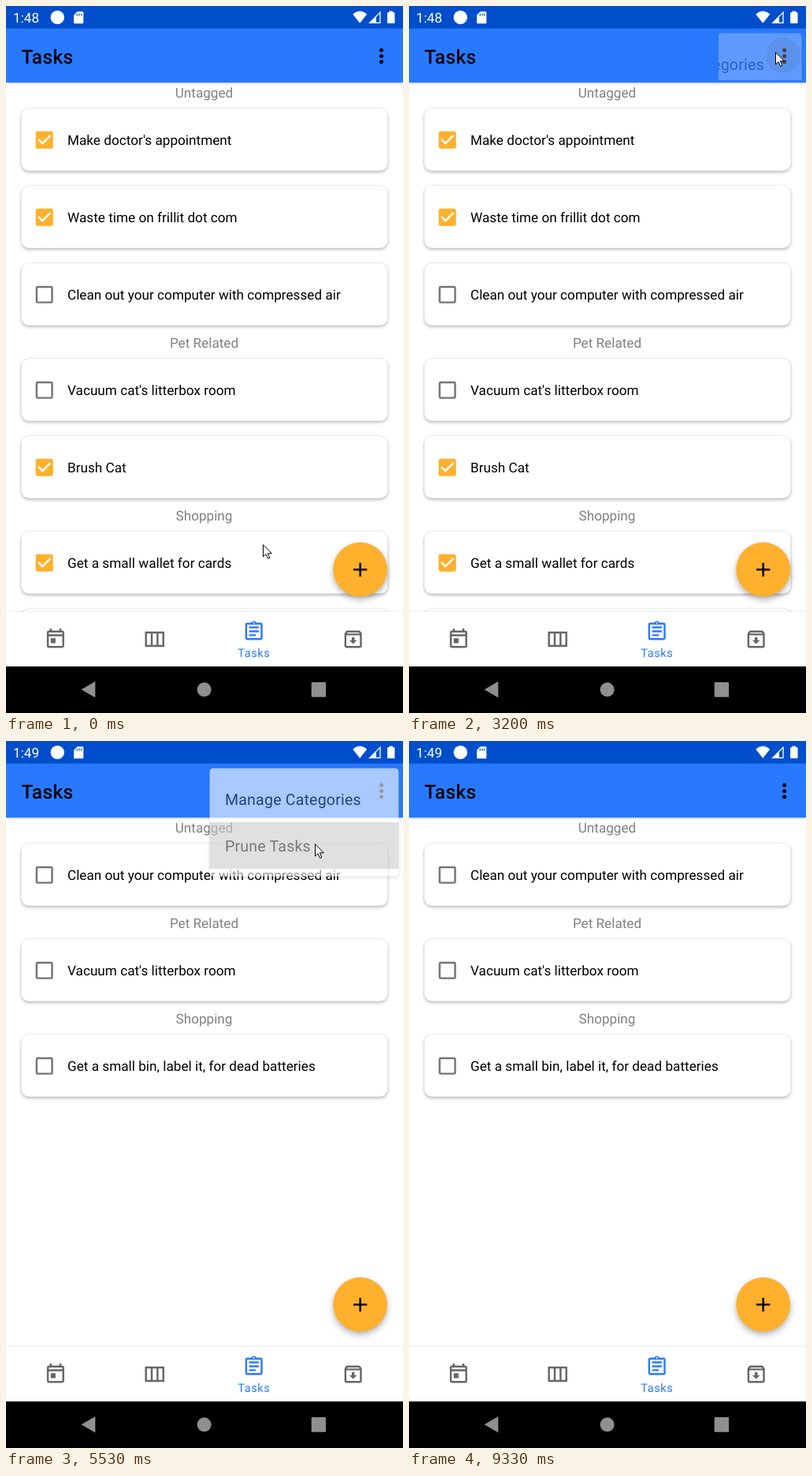
These frames come from a looping animation (504 by 896 pixels, 9670 ms). An HTML page:

```html
<!DOCTYPE html>
<html lang="en">
<head>
<meta charset="utf-8">
<title>Tasks</title>
<style>
  html, body { margin: 0; width: 100%; height: 100%; overflow: hidden; background: #fff; }
  svg { display: block; width: 100%; height: 100%; }
  text { font-family: Roboto, "Noto Sans", sans-serif; font-size: 17.15px; text-rendering: geometricPrecision; }
  .card { fill: #fff; filter: drop-shadow(0 2px 2px rgba(0,0,0,.24)) drop-shadow(0 0 1px rgba(0,0,0,.12)); }
  .bar { filter: drop-shadow(0 1px 1.5px rgba(0,0,0,.25)); }
  .nav { filter: drop-shadow(0 -1px 1px rgba(0,0,0,.08)); }
  .fab { fill: #ffb02c; filter: drop-shadow(0 4px 4px rgba(0,0,0,.27)) drop-shadow(0 0 1px rgba(0,0,0,.1)); }
  .pop { fill: #fff; filter: drop-shadow(0 1px 2px rgba(0,0,0,.25)); }
  .section { fill: #808080; text-anchor: middle; }
  .label { letter-spacing: .02px; }
  .title { font-size: 24.5px; font-weight: 500; letter-spacing: .35px; }
  .tab { font-size: 14.7px; letter-spacing: .49px; fill: #2979ff; }
  .item { font-size: 19.6px; letter-spacing: .18px; fill: #212121; }
  .line { fill: none; stroke-width: 2; }
</style>
</head>
<body>
<svg viewBox="0 0 504 896">
  <defs>
    <clipPath id="reveal"><rect id="window"/></clipPath>
  </defs>
  <rect width="504" height="896" fill="#fff"/>
  <g id="before"></g>
  <g id="after"></g>

  <circle class="fab" cx="449.7" cy="714.1" r="34.3"/>
  <path d="M441.1 714.3h17.2M449.7 705.7v17.2" stroke="#000" stroke-width="2.5"/>

  <rect class="bar" y="28" width="504" height="69" fill="#2979ff"/>
  <text class="title" x="19.6" y="73">Tasks</text>
  <circle id="press" cx="475" cy="62.3" r="22.3"/>
  <circle cx="476.6" cy="56" r="2.5"/>
  <circle cx="476.6" cy="63.4" r="2.5"/>
  <circle cx="476.6" cy="70.8" r="2.5"/>

  <rect width="504" height="28.5" fill="#004ecb"/>
  <g fill="#fff">
    <text id="clock" x="9" y="21"></text>
    <circle cx="65.3" cy="14.4" r="8.7"/>
    <path d="M90.5 7H97a1.3 1.3 0 0 1 1.3 1.3V21a1.3 1.3 0 0 1-1.3 1.3H87.4A1.3 1.3 0 0 1 86.1 21V11.4Z"/>
    <path d="M90.3 9.5v3M93 9.5v3M95.7 9.5v3" stroke="#004ecb" stroke-width="1.2"/>
    <path d="M440.3 10.4Q449.2 2.8 458.2 10.4L449.2 21.8Z"/>
    <path d="M461.8 21.4L475 8V21.4Z" fill="none" stroke="#fff" stroke-width="1.3"/>
    <path d="M460.5 22L470 12.4V22Z"/>
    <path d="M486.5 8V6.5h4.6V8h1.4a1 1 0 0 1 1 1V21a1 1 0 0 1-1 1h-7.4a1 1 0 0 1-1-1V9a1 1 0 0 1 1-1Z"/>
  </g>

  <rect class="nav" y="768" width="504" height="70" fill="#fff"/>
  <g fill="#666">
    <path transform="translate(48.2 787.8) scale(1.225)" fill-rule="evenodd" d="M19 3h-1V1h-2v2H8V1H6v2H5a2 2 0 0 0-2 2V19a2 2 0 0 0 2 2H19a2 2 0 0 0 2-2V5a2 2 0 0 0-2-2ZM19 19H5V9H19ZM19 7H5V5H19ZM7 11h5v5H7Z"/>
    <path transform="translate(174 787.8) scale(1.225)" class="line" stroke="#666" d="M3 5H21V19H3ZM9 5V19M15 5V19"/>
    <g transform="translate(426 787.8) scale(1.225)">
      <path fill-rule="evenodd" d="M20.5 5.2L19.1 3.5A1.5 1.5 0 0 0 18 3H6a1.5 1.5 0 0 0-1.2.5L3.5 5.2A2 2 0 0 0 3 6.5V19a2 2 0 0 0 2 2H19a2 2 0 0 0 2-2V6.5a2 2 0 0 0-.5-1.3ZM6.2 5H17.8L18.6 6H5.4ZM5 19V8H19V19Z"/>
      <path d="M10.6 10h2.8v3H16l-4 4-4-4h2.6Z"/>
    </g>
  </g>
  <g transform="translate(300 777.8) scale(1.225)" stroke="#2979ff" class="line">
    <rect x="4" y="4" width="16" height="16" rx="1"/>
    <path d="M7 8H17M7 12H17M7 16H14"/>
    <path d="M9.2 3.4a2.9 2.9 0 0 1 5.6 0Z" fill="#2979ff" stroke="none"/>
    <circle cx="12" cy="3.2" r=".8" fill="#fff" stroke="none"/>
  </g>
  <text class="tab" x="294.3" y="825">Tasks</text>

  <rect y="837" width="504" height="59"/>
  <g fill="#8f8f8f">
    <path d="M95.6 866.3L113.3 856V876.6Z"/>
    <circle cx="251.6" cy="866.3" r="9"/>
    <rect x="387.7" y="857" width="18.4" height="18.8" rx="1"/>
  </g>

  <g id="menu" clip-path="url(#reveal)">
    <rect class="pop" x="258.5" y="34.5" width="240" height="137" rx="4.5"/>
    <rect id="hover" x="258.5" y="103" width="240" height="59"/>
    <text class="item" x="278" y="81.3">Manage Categories</text>
    <text class="item" x="278" y="140.1">Prune Tasks</text>
  </g>
  <path id="cursor" d="M.5 .7V16L4 12.7L6.6 18.4L8.8 17.5L6.4 11.8H11.3Z" fill="#fff" stroke="#000" stroke-linejoin="round"/>
</svg>
<script>
const $ = id => document.getElementById(id);
const LOOP = 9670, RATE = 15;

const sections = [
  ["Untagged", ["Make doctor's appointment", true], ["Waste time on frillit dot com", true],
    ["Clean out your computer with compressed air"]],
  ["Pet Related", ["Vacuum cat's litterbox room"], ["Brush Cat", true]],
  ["Shopping", ["Get a small wallet for cards", true], ["Get a small bin, label it, for dead batteries"]]
];

function card(y, label, done) {
  const box = done
    ? `<rect x="3" y="3" width="18" height="18" rx="2" fill="#ffb02c"/>
       <path class="line" d="M5.7 11.3L10 15.6L18.3 7.3" stroke="#fff"/>`
    : `<rect class="line" x="4" y="4" width="16" height="16" rx="1" stroke="#757575"/>`;
  return `<rect class="card" x="19.5" y="${y}" width="465" height="78.8" rx="9.8"/>
    <g transform="translate(34 ${y + 25.1}) scale(1.225)">${box}</g>
    <text class="label" x="78" y="${y + 46}">${label}</text>`;
}

function list(keep) {
  let y = 130, html = "";
  for (const [name, ...tasks] of sections) {
    html += `<text class="section" x="251.5" y="${y - 14}">${name}</text>`;
    for (const [label, done] of tasks.filter(keep)) {
      html += card(y, label, done);
      y += 98;
    }
    y += 23;
  }
  return html;
}

$("before").innerHTML = list(() => true);
$("after").innerHTML = list(([, done]) => !done);

const ramp = (t, a, b) => Math.min(1, Math.max(0, (t - a) / (b - a)));
const linear = u => u;
const smooth = u => u * u * (3 - 2 * u);
const speedUp = u => u ** 1.5;

// Each move starts where the last one ended; bend pulls the path sideways.
const moves = [
  { begin: 12, end: 27, to: [371, 251], ease: smooth, bend: [-44, 14] },
  { begin: 27, end: 41, to: [465, 58], ease: linear },
  { begin: 49, end: 59, to: [392, 130], ease: smooth },
  { begin: 97, end: 109, to: [342, 495], ease: smooth },
  { begin: 128, end: 140, to: [0, 925], ease: speedUp }
];

function pointer(step) {
  let pos = [326, 682];
  for (const { begin, end, to, ease, bend = [0, 0] } of moves) {
    const s = ease(ramp(step, begin, end));
    pos = pos.map((p, i) => p + (to[i] - p) * s + 2 * bend[i] * s * (1 - s));
  }
  return pos.map(Math.round);
}

function set(id, attrs) {
  for (const key in attrs) $(id).setAttribute(key, attrs[key]);
}

const show = (id, on) => set(id, { visibility: on ? "visible" : "hidden" });

function draw(time) {
  const step = Math.floor((time % LOOP + 3.4) * RATE / 1000);
  const grow = .3 + .7 * ramp(step, 47, 52);
  const pruned = step >= 83;

  show("before", !pruned);
  show("after", pruned);
  show("cursor", step < 140);
  set("cursor", { transform: `translate(${pointer(step)})` });
  set("menu", { opacity: ramp(step, 47, 51) * (1 - ramp(step, 81, 86)) });
  set("window", { x: 504 - 252 * grow, y: 28, width: 252 * grow, height: 150 * grow });
  set("press", { opacity: step < 45 ? 0 : .13 * (1 - ramp(step, 47, 51)) });
  set("hover", { opacity: .2 * ramp(step, 79, 83) });
  $("clock").textContent = step < 52 ? "1:48" : "1:49";
}

const start = performance.now();
function tick() {
  draw(performance.now() - start);
  requestAnimationFrame(tick);
}
tick();
</script>
</body>
</html>
```
